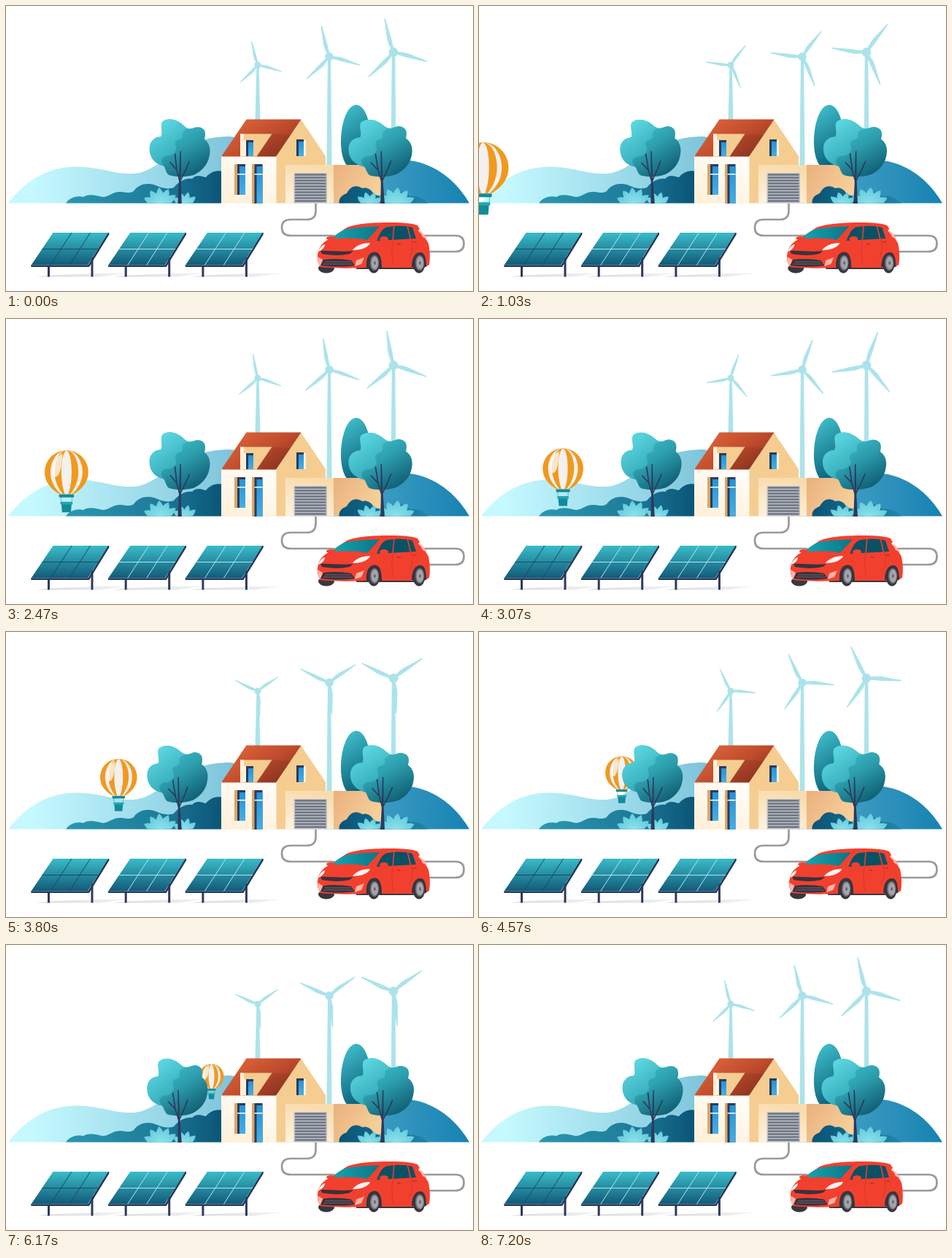
An HTML page for the animation above (7.23 s loop, 640 by 391 pixels).

```html
<!DOCTYPE html>
<html lang="en">
<head>
<meta charset="utf-8">
<title>Green energy home</title>
<style>
  html, body { margin: 0; width: 100%; height: 100%; overflow: hidden; background: #fff; }
  svg { display: block; width: 100%; height: 100%; }
</style>
</head>
<body>
<svg viewBox="0 0 640 391" xmlns="http://www.w3.org/2000/svg">
  <defs>
    <linearGradient id="hill" gradientUnits="userSpaceOnUse" x1="3" x2="635" y1="0" y2="0">
      <stop offset=".05" stop-color="#c6f9ff"/><stop offset=".45" stop-color="#84c9de"/><stop offset="1" stop-color="#1682b2"/>
    </linearGradient>
    <linearGradient id="bush" gradientUnits="userSpaceOnUse" x1="82" x2="300" y1="0" y2="0">
      <stop offset="0" stop-color="#2b97b0"/><stop offset=".55" stop-color="#1f7d9c"/><stop offset="1" stop-color="#0a5376"/>
    </linearGradient>
    <linearGradient id="bush2" x1="0" x2="1" y1="0" y2="0">
      <stop offset="0" stop-color="#0a5376"/><stop offset="1" stop-color="#1f86a8"/>
    </linearGradient>
    <linearGradient id="cypress" x1="0" x2=".3" y1="0" y2="1">
      <stop offset="0" stop-color="#44c6d2"/><stop offset="1" stop-color="#0c6179"/>
    </linearGradient>
    <linearGradient id="crown" x1=".2" x2=".85" y1="0" y2="1">
      <stop offset="0" stop-color="#45ccd6"/><stop offset=".5" stop-color="#2c9dac"/><stop offset="1" stop-color="#0c566c"/>
    </linearGradient>
    <linearGradient id="crownLight" x1="0" x2=".6" y1="0" y2="1">
      <stop offset="0" stop-color="#66e2ea"/><stop offset="1" stop-color="#2fa5b4"/>
    </linearGradient>
    <linearGradient id="leaf" x1="0" x2="0" y1="0" y2="1">
      <stop offset="0" stop-color="#62cbdc"/><stop offset="1" stop-color="#94e4ee"/>
    </linearGradient>
    <linearGradient id="roof" x1="0" x2="1" y1=".2" y2=".9">
      <stop offset="0" stop-color="#e0663c"/><stop offset=".55" stop-color="#bd4a2c"/><stop offset="1" stop-color="#7e2f1c"/>
    </linearGradient>
    <linearGradient id="wall" x1="0" x2=".6" y1="1" y2="0">
      <stop offset="0" stop-color="#ffefd6"/><stop offset="1" stop-color="#fffcf7"/>
    </linearGradient>
    <linearGradient id="garage" x1=".3" x2="0" y1="0" y2="1">
      <stop offset="0" stop-color="#f9dcae"/><stop offset="1" stop-color="#fff3e0"/>
    </linearGradient>
    <linearGradient id="annex" x1="0" x2="1" y1="0" y2=".5">
      <stop offset="0" stop-color="#eab07d"/><stop offset="1" stop-color="#f6d09a"/>
    </linearGradient>
    <linearGradient id="glass" x1="0" x2="0" y1="0" y2="1">
      <stop offset="0" stop-color="#2593d6"/><stop offset="1" stop-color="#46aee6"/>
    </linearGradient>
    <linearGradient id="panel" x1="0" x2="0" y1="0" y2="1">
      <stop offset="0" stop-color="#39bcc9"/><stop offset="1" stop-color="#125a78"/>
    </linearGradient>
    <linearGradient id="shield" x1="0" x2="1" y1="0" y2="0">
      <stop offset="0" stop-color="#14a6b4"/><stop offset="1" stop-color="#0b7586"/>
    </linearGradient>
    <linearGradient id="shade" x1="0" x2="1" y1="0" y2="0">
      <stop offset="0" stop-color="#d5d8da"/><stop offset="1" stop-color="#f4f5f5"/>
    </linearGradient>
    <clipPath id="ground"><rect y="-160" x="-300" width="900" height="159.5"/></clipPath>

    <path id="blade" d="M-1.8-4C-3.500-10-4.600-18-3.300-25L-.9-48H.6L1.800-22 1.800-4Z"/>
    <path id="leafShape" d="M0 0C-7-8-6-18 0-24C6-18 7-8 0 0Z" fill="url(#leaf)"/>

    <g id="tree">
      <path fill="url(#crown)" d="M-26-112C-18-118-8-115-2-111C3-108 6-103 11-103C17-103 20-107 26-105C33-103 34-97 32-89C40-83 41-74 39-65C37-54 29-45 19-40C9-36-8-36-16-39C-20-42-20-47-23-51C-37-54-43-64-43-75C-43-85-36-91-28-91C-24-96-30-106-26-112Z"/>
      <path fill="url(#crownLight)" d="M-26-112C-18-118-8-115-2-111C3-108 6-103 11-103C3-101 0-98 2-91C-1-86-9-89-8-80C-3-72-11-64-20-65C-28-63-28-56-23-51C-37-54-43-64-43-75C-43-85-36-91-28-91C-24-96-30-106-26-112Z"/>
      <path fill="#2c3a5c" d="M-2.600 0L-1.500-32-1.200-72H.2L1-32 2.800 0Z"/>
      <path fill="none" stroke="#2c3a5c" stroke-width="1.600" stroke-linecap="round" d="M0-28L-5-46-8-68M-5-46L-14-56M.5-32L8-48 12-58"/>
    </g>

    <g id="solar">
      <path stroke="none" fill="url(#shade)" d="M42 371.500L60 369.500 125 367 168 366.500 130 371.500Z"/>
      <path stroke="#2c3a5c" stroke-width="3" d="M58.500 357V371.500M118 345V371.500"/>
      <path stroke="none" fill="#25375a" d="M34 355.500L112.500 355.500 139.500 311 141.300 311V313.500L114 358H34.500Z"/>
      <path stroke="none" fill="url(#panel)" d="M64.500 311H140L112 355.500H34.500Z"/>
      <path fill="none" d="M90 311L61 355.500M115.500 311L87 355.500M49.500 333.500H126.500"/>
    </g>

    <g id="wheel">
      <ellipse rx="8.500" ry="14" fill="#38373f"/>
      <ellipse cx="1" rx="6" ry="10.500" fill="#77787f"/>
      <ellipse cx="1.400" rx="4.600" ry="8.500" fill="#a4a4aa"/>
      <ellipse cx="1.400" rx="1.500" ry="2.500" fill="#6a6a72"/>
    </g>
  </defs>

  <rect width="640" height="391" fill="#fff"/>
  <g id="turbines" fill="#ace3ea"></g>

  <g fill="url(#hill)">
    <path d="M3 270.500C26 240 58 220 98 220.500C130 221 148 231 174 230C212 228 234 181 303 179C330 178 350 200 370 270.500Z"/>
    <path d="M440 270.500C465 222 510 211 542 211C584 212 616 238 635 270.500Z"/>
  </g>
  <path fill="url(#cypress)" d="M480 135.500C494 136 501 166 500 190C499 210 494 225 480 225C466 225 460 210 459 190C458 166 466 136 480 135.500Z"/>
  <path fill="url(#bush)" d="M82 270.500C88 262 98 260 106 262C114 257 124 260 132 262C142 262 146 254 158 255C166 256 170 257 175 254C182 244 194 242 205 246C214 250 222 252 230 249C238 240 246 236 255 237C262 230 268 234 274 235C281 226 290 225 300 227V270.500Z"/>
  <g id="balloon">
    <path fill="#f0991f" d="M0-45.500C18-45.500 32-31 32-13.500C32 2 22 12 11 18.500H-11C-22 12-32 2-32-13.500C-32-31-18-45.500 0-45.500Z"/>
    <path fill="#f3f0ee" d="M0-45.500C14-45 23.500-30 23.500-13.500C23.500 1 16 12 8 18.500H-8C-16 12-23.500 1-23.500-13.500C-23.500-30-14-45 0-45.500Z"/>
    <path fill="#f0991f" d="M0-45.500C11-45 17.500-30 17.500-13.500C17.500 1 11 12 6 18.500H-6C-11 12-17.500 1-17.500-13.500C-17.500-30-11-45 0-45.500Z"/>
    <path fill="#f3f0ee" d="M0-45.500C5-43 7.500-30 7.500-13.500C7.500 1 5 12 2.500 18.500H-2.500C-5 12-7.500 1-7.500-13.500C-7.500-30-5-43 0-45.500Z"/>
    <path fill="#fff" opacity=".75" d="M-6-41C-17-36-23-22-19-7C-12-4-7-14-6-41Z"/>
    <rect x="-11" y="19" width="22" height="4.500" rx="1" fill="#128b9a"/>
    <path stroke="#128b9a" stroke-width=".6" d="M-8 23V30M8 23V30"/>
    <path fill="#128b9a" d="M-7.500 33H7.500L6.500 45.500H-6.500Z"/>
    <rect x="-9" y="30" width="18" height="4" rx="1" fill="#23a6b2"/>
  </g>

  <g id="house">
    <path fill="#f5cd91" d="M404 155.500L438 206V270.500H370V206Z"/>
    <rect x="383" y="218" width="67" height="52.500" fill="url(#garage)"/>
    <rect x="449" y="218" width="66" height="52.500" fill="url(#annex)"/>
    <rect x="394.500" y="229" width="45.500" height="41.500" fill="#bfc2c9"/>
    <path id="shutter" stroke="#6d7482" stroke-width="2.500"/>
    <rect x="295" y="205" width="75.500" height="66" fill="url(#wall)"/>
    <path fill="url(#roof)" d="M295 206.500L329.500 155.500H404.500L370 206.500Z"/>
    <path fill="#f5cd91" d="M321 175.500H364.500L343.500 206.500H321Z"/>
    <path fill="#fff1da" d="M321 175.500H326V206.500H321Z"/>
    <path fill="#7e2f1c" opacity=".25" d="M364.500 175.500L343.500 206.500H370L390 177Z"/>
    <g id="windows"></g>
  </g>
  <path fill="url(#bush2)" d="M456.500 270.500C456 262 462 259 467 257C471 248 480 244 488 250C495 248 501 252 504 258C512 262 520 261 526 257C536 251 547 255 553 261C566 260 572 265 579 270.500Z"/>

  <g class="leaves" transform="translate(225 271)" clip-path="url(#ground)"></g>
  <g class="leaves" transform="translate(520 271) scale(-1.1 1)" clip-path="url(#ground)"></g>
  <g id="treeLeft"><use href="#tree"/></g>
  <g id="treeRight"><use href="#tree"/></g>

  <g id="panels"></g>

  <path fill="none" stroke="#9a9a9a" stroke-width="2.700" d="M424.500 271V281Q424.500 293 412 293H390Q378 293 378 304T390 315H450M560 315H616Q627.500 315 627.500 326T616 337H570"/>

  <g id="car">
    <ellipse cx="439" cy="360" rx="11" ry="6.500" fill="#38373f"/>
    <path fill="#38373f" d="M480 352H572V361H480Z"/>
    <path fill="#f2402f" d="M428 337C430 328 437 322 446 318L467 304C480 298.500 504 297 527 297C545 297 556 298 564 301L567 306 565 308C570 314 576 319 579 326C581 336 581.500 346 580 355L573 359H490C478 360 446 360 431 358C426 352 426 343 428 337Z"/>
    <path fill="url(#shield)" d="M446 320C454 312 461 307 469 305.500C482 303.500 498 302.500 512 302.500L495 321C479 318 462 318 446 320Z"/>
    <path fill="#0a5164" d="M508 322C512 313 515 306 521 303.500C534 301 548 301 557 304L562 319Z"/>
    <path stroke="#f2402f" stroke-width="1.500" d="M532 300L530 322M550 301L555 322"/>
    <path fill="none" stroke="#cf3328" stroke-width=".8" d="M530 322C528 335 529 346 531 355M555 320C559 330 557 338 553 345"/>
    <path fill="#c42b22" d="M536 326H541V327.500H536ZM558 323H563V324.500H558Z"/>
    <ellipse cx="518" cy="319.500" rx="6" ry="3.500" fill="#f2402f"/>
    <ellipse cx="445" cy="318.500" rx="6" ry="2.500" fill="#f2402f"/>
    <path fill="#fff3f0" d="M475 335C479 329 488 325 499 325C497 331 487 335 475 335ZM428 337C430 331 433 328 437 327C437 331 433 335 428 337Z"/>
    <path fill="#38323c" d="M431 336C444 335 459 338 476 336L471 340C458 343 444 342 433 340Z"/>
    <path fill="#ffb4a8" d="M427 344L434 348 431 357 428 354ZM480 349L491 345 487 354 478 357Z"/>
    <path fill="#38323c" d="M435 348C448 346 462 347 473 349L478 356C463 358 446 358 431 356Z"/>
    <path stroke="#77717b" stroke-width=".8" d="M437 351H473M435 354H475"/>
    <path fill="#ffb3a6" d="M566 307C571 311 575 315 577 320L571 317Z"/>
    <path fill="#38323c" d="M494 359C493 345 498 337.500 505 337.500C512 337.500 515 345 515 359ZM556 358C556 345 561 338 568 338C574 338 576 346 576 358Z"/>
    <use href="#wheel" x="504" y="352.500"/>
    <use href="#wheel" x="566" y="352.500"/>
  </g>
</svg>
<script>
  const LOOP = 7230, TURN = 7200, SWAY = 2400;
  const byId = id => document.getElementById(id);
  const place = (id, transform) => byId(id).setAttribute("transform", transform);
  const times = (n, make) => Array.from({ length: n }, (_, i) => make(i)).join("");
  const rect = (x, y, w, h, fill) => `<rect x="${x}" y="${y}" width="${w}" height="${h}" fill="${fill}"/>`;

  const turbines = [
    { x: 345, y: 81, size: 0.71, foot: 160 },
    { x: 443, y: 69.5, size: 0.91, foot: 222 },
    { x: 531, y: 63.5, size: 1, foot: 222 }
  ];
  byId("turbines").innerHTML = turbines.map(({ x, y, size, foot }, i) => `
    <path d="M${x - 2.2 * size} ${y}H${x + 2.2 * size}L${x + 3.6} ${foot}H${x - 3.6}Z"/>
    <circle cx="${x}" cy="${y}" r="${6.4 * size}"/>
    <g id="rotor${i}">${times(3, k => `<use href="#blade" transform="rotate(${k * 120})"/>`)}</g>`).join("");

  byId("panels").innerHTML = times(3, i =>
    `<use href="#solar" x="${i * 105.7}" stroke="${i ? "#b5e6ec" : "#1b4964"}"/>`);

  byId("shutter").setAttribute("d", times(10, i => `M396 ${231.5 + i * 4}H438.500`));

  const tan = "#d9a766", navy = "#2c3a5c", cream = "#fff1da", glass = "url(#glass)";
  const casement = (x, y, w, h) => rect(x, y, w, h, navy) + rect(x + 3, y + 3, w - 3, h - 3, glass);
  byId("windows").innerHTML = [
    rect(313, 217, 4, 42, tan), casement(317, 217, 11, 42), rect(317, 230, 11, 1.5, "#fff"),
    rect(337, 217, 4, 54, tan), casement(340.5, 217, 11, 54), rect(340.5, 230, 11, 1.5, "#fff"),
    rect(326, 184, 3, 22, cream), casement(329, 184, 10, 22),
    casement(398, 183, 10, 23), rect(408, 184, 3, 22, cream)
  ].join("");

  const fan = (x, size, angles) => angles.map(a =>
    `<use href="#leafShape" transform="translate(${x} 3) scale(${size}) rotate(${a})"/>`).join("");
  document.querySelectorAll(".leaves").forEach(g => {
    g.innerHTML = fan(-13, 1.05, [-65, -35, -5, 25, 55]) + fan(20, 0.8, [-55, -20, 15, 50]);
  });

  const ease = (t, from, to) => {
    const p = Math.min(1, Math.max(0, (t - from) / (to - from)));
    return p * p * (3 - 2 * p);
  };
  const carShift = t => 4.7 * (
    ease(t, 1440, 1850) - ease(t, 0, 620) + ease(t, 5800, 6170) - ease(t, 4310, 4930));

  function draw(now) {
    const t = Math.min(now % LOOP, TURN);
    turbines.forEach(({ x, y, size }, i) =>
      place("rotor" + i, `translate(${x} ${y}) rotate(${t / TURN * 360 - 14.4}) scale(${size})`));

    const sway = Math.cos(t / SWAY * 2 * Math.PI);
    place("treeLeft", `translate(238 271) rotate(${1.3 * sway})`);
    place("treeRight", `translate(516 271) rotate(${-sway}) scale(1.05 1)`);

    place("balloon", `translate(${0.0537 * t - 49.8} ${246.4 - 0.00958 * t}) scale(${(77 - 0.00698 * t) / 64})`);
    place("car", `translate(${carShift(t)})`);
  }

  const start = performance.now();
  (function tick() {
    draw(performance.now() - start);
    requestAnimationFrame(tick);
  })();
</script>
</body>
</html>
```
